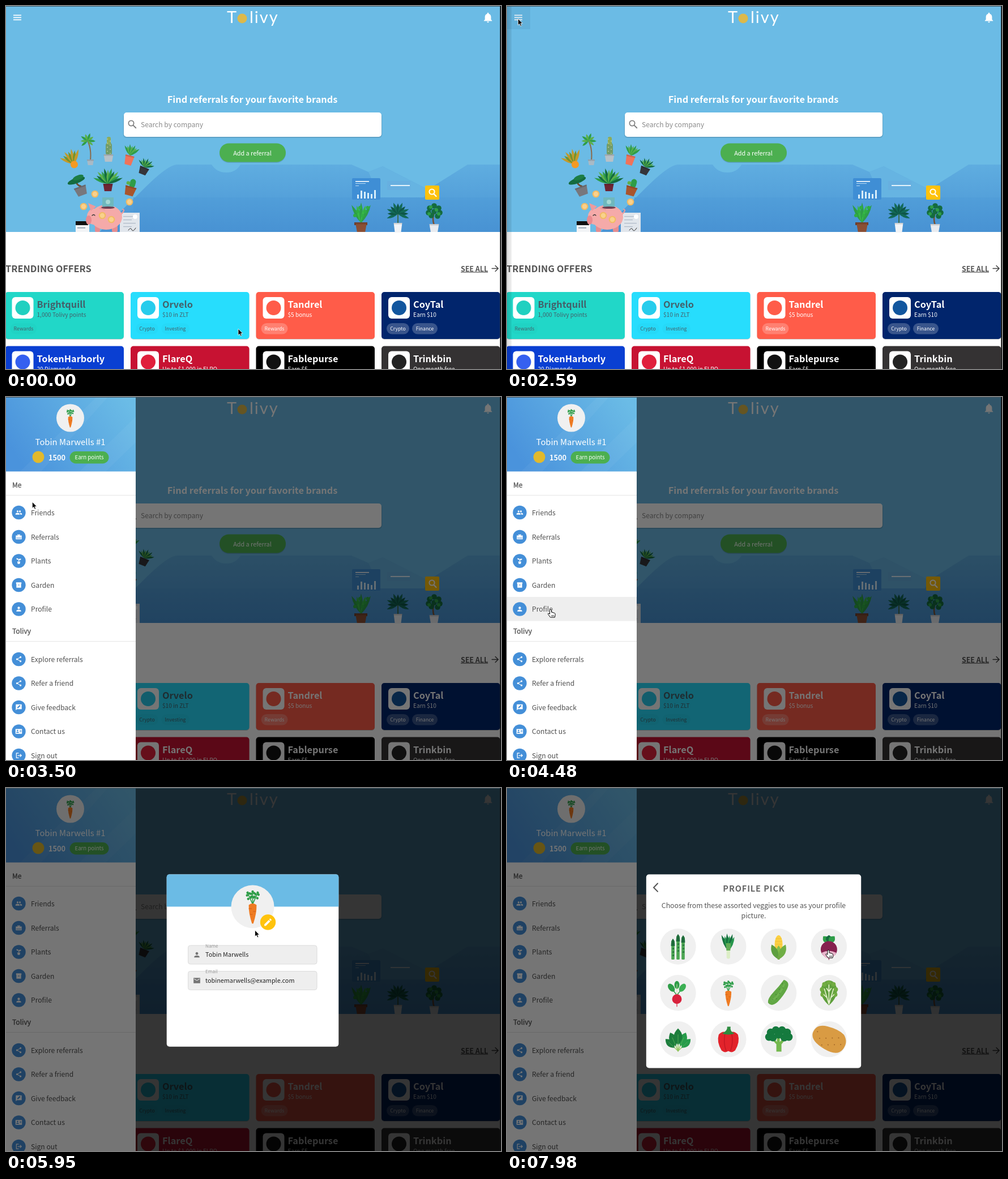
An HTML page for the animation above (8 s loop, 874 by 641 pixels).

```html
<!DOCTYPE html>
<html lang="en">
<head>
<meta charset="utf-8">
<title>Referral menu</title>
<style>
html, body { margin: 0; width: 100%; height: 100%; overflow: hidden; background: #fff; }
svg { display: block; width: 100vw; height: 100vh; }
text { font-family: "Noto Sans CJK JP", "Noto Sans CJK SC", "Open Sans", sans-serif; white-space: pre; }
.b { font-weight: 700; }
.m { text-anchor: middle; }
.logo { font-family: Lato, sans-serif; letter-spacing: 2px; }
</style>
</head>
<body>
<svg id="stage" viewBox="0 0 874 641" preserveAspectRatio="none"></svg>
<script>
const at = (x, y, c, rot = 0, s = 1) =>
  `<g transform="translate(${x} ${y}) rotate(${rot}) scale(${s})">${c}</g>`;
const rect = (x, y, w, h, fill, r = 0, more = '') =>
  `<rect x="${x}" y="${y}" width="${w}" height="${h}" rx="${r}" fill="${fill}" ${more}/>`;
const ell = (x, y, rx, ry, fill) => `<ellipse cx="${x}" cy="${y}" rx="${rx}" ry="${ry}" fill="${fill}"/>`;
const circ = (x, y, r, fill) => ell(x, y, r, r, fill);
const path = (d, fill) => `<path d="${d}" fill="${fill}" fill-rule="evenodd"/>`;
const line = (d, color, w = 1) =>
  `<path d="${d}" fill="none" stroke="${color}" stroke-width="${w}" stroke-linecap="round"/>`;
const text = (x, y, size, fill, s, cls = '') =>
  `<text x="${x}" y="${y}" font-size="${size}" fill="${fill}" class="${cls}">${s}</text>`;
const group = (id, c) => `<g id="${id}">${c}</g>`;
const range = (n, f) => Array.from({ length: n }, (_, i) => f(i)).join('');
const icon = (x, y, size, c) => at(x - size / 2, y - size / 2, c, 0, size / 24);

// Plants
const leaf = (len, w, fill) => path(`M0 0Q${w} ${-len / 2} 0 ${-len}Q${-w} ${-len / 2} 0 0`, fill);
const fan = (n, spread, len, w, fills) =>
  range(n, i => {
    const a = n > 1 ? -spread + 2 * spread * i / (n - 1) : 0;
    return at(0, 0, leaf(len * (1 - .12 * (i % 2)), w, fills[i % fills.length]), a);
  });
const pot = (w, h, fill) =>
  path(`M${-w / 2} 0h${w}l${-w * .14} ${h}h${-w * .72}z`, fill) + rect(-w / 2, 0, w, 2.5, '#0002');
const G1 = '#2e9d48', G2 = '#146b3f', G3 = '#5cb04a';
const blobs = (pts, r, fill) => pts.map(([x, y]) => circ(x, y, r, fill)).join('');

const leftPlants =
  at(120, 279, fan(7, 42, 27, 5, ['#c39a2c', '#6f942f']) + circ(0, 1, 6.5, '#f59a23'), -25) +
  line('M149 272Q151 252 144 238', '#8a6a4a', 2) + at(144, 238, fan(8, 130, 14, 4, [G1, G3])) + at(149, 271, pot(12, 10, '#a9bac6')) +
  rect(176, 241, 11, 23, '#719c6a', 5) + rect(178, 231, 7, 14, '#8cab5b', 3) +
  range(8, i => circ(179 + i % 2 * 5, 235 + i * 3.6, .8, '#e3dfae')) + at(181, 262, pot(17, 13, '#b7c1c8')) +
  at(219, 264, fan(7, 42, 20, 4, [G1, G3]) + pot(16, 17, '#f0735a'), 14) +
  at(245, 285, fan(9, 60, 17, 3, [G2, G3]) + pot(17, 13, '#35353a'), 22) +
  at(130, 319, line('M2 0Q-5-5-2-13', '#6f4c35', 3) + ell(-2, -12, 16, 5, G2) + ell(3, -16, 10, 4, '#1d7d45') + pot(22, 16, '#77777d'), -20) +
  at(180, 314, fan(11, 68, 28, 5, [G1, G2, G3]) + pot(17, 13, '#6d2433')) +
  at(221, 319, rect(-4, -14, 10, 16, G1, 5) + rect(-10, -8, 7, 6, G3, 3) + pot(20, 16, '#a9552c'), 16);

const pig =
  rect(201, 365, 35, 34, '#e1e6ec') + range(4, i => rect(207, 371 + i * 6, 22 - i % 2 * 7, 1.2, '#aeb9c6')) +
  circ(228, 372, 4, '#fff') + line('M216 396q4-6 6-1t7-3', '#333', 1) +
  rect(123, 380, 24, 19, '#f2f4f6') + rect(123, 380, 22, 7, '#111') + rect(126, 391, 14, 1.5, '#8796a6') +
  rect(157, 384, 9, 15, '#e58d91', 2) + rect(187, 384, 10, 15, '#e58d91', 2) +
  ell(177, 373, 28, 22, '#f5aaa9') + ell(155, 372, 12, 14, '#f5aaa9') + ell(146, 378, 5, 8, '#e98b90') +
  path('M150 362l-5-14 14 6zM164 358l7-8 4 11z', '#ee9a9c') + line('M152 370q3-3 5 0', '#333', 1.3) +
  line('M204 367q7-7 2-8', '#ee9a9c', 2) +
  rect(170, 338, 20, 18, '#6fb8bd') + circ(180, 346, 4, '#a5d8d4') + ell(180, 356, 12, 2, '#703f52');
const coin = (x, y) => circ(x, y, 6.3, '#f2bb63') + circ(x, y, 4.2, '#f9d18c');

const rightScene =
  rect(611, 304, 50, 38, '#3f8ed5', 2) +
  rect(617, 309, 24, 1.6, '#fff') + rect(617, 313, 18, 1, '#b8dcf5') + rect(617, 317, 6, 1, '#b8dcf5') +
  range(6, i => { const h = 7 + i * 7 % 9; return rect(620 + i * 6, 340 - h, 3, h, '#d8eefb'); }) +
  rect(673, 309, 41, 16, '#67afe0') + rect(679, 316, 34, 2, '#e3f2fb') +
  rect(740, 317, 25, 25, '#ffc20d', 2) + `<circle cx="752" cy="328" r="4.6" fill="none" stroke="#fff" stroke-width="2"/>` + line('M755.5 332l4 4', '#fff', 2.2) +
  at(627, 383, fan(5, 28, 36, 6, [G1, '#38b848']) + range(6, i => circ(-11 + i * 4.5, -13 - i % 3 * 7, 3, '#2fae43')) + rect(-12, -1, 23, 5, '#6d3f2e') + pot(20, 16, '#8a4f35')) +
  at(692, 383, line('M0 0V-20', '#3d6c4b', 2) + at(0, -16, fan(11, 112, 21, 5, ['#136a57', '#0e5648'])) + pot(15, 17, '#f1f3f6')) +
  at(756, 385, line('M0 2Q-4-9 0-20', '#7a5032', 2.5) +
    blobs([[-8, -28], [0, -32], [8, -28], [-10, -20], [10, -20], [0, -22], [-5, -15], [6, -14]], 4.8, G2) +
    blobs([[-6, -30], [4, -25], [8, -18], [-9, -18]], 3, G1) + pot(17, 14, '#e9ebef'));

const bell = path('M12 22c1.1 0 2-.9 2-2h-4c0 1.1.9 2 2 2zm6-6v-5c0-3.07-1.63-5.64-4.5-6.32V4c0-.83-.67-1.5-1.5-1.5s-1.5.67-1.5 1.5v.68C7.64 5.36 6 7.92 6 11v5l-2 2v1h16v-1l-2-2z', '#fff');

const hero =
  rect(0, 0, 874, 399, '#6bbbe5') +
  path('M165 399L236 330Q285 280 302 280H363Q372 294 389 294T414 280H610L640 293 665 283 745 324 815 280H874V399Z', 'url(#hill)') +
  path('M640 293L665 283 745 324 738 338H660Z', '#66b4e2') +
  rect(225, 338, 649, 61, 'url(#floor)') +
  leftPlants + pig + [[157, 332], [218, 346], [137, 354], [170, 370], [186, 377]].map(p => coin(...p)).join('') +
  rightScene +
  range(3, i => rect(13, 15.5 + i * 4, 14, 1.7, '#fff')) +
  text(390, 30, 29, '#fff', 'T', 'logo') + circ(417, 22, 8.5, '#dcb94b') + text(430, 30, 29, '#fff', 'livy', 'logo') +
  at(840.2, 9.5, bell, 0, .9) +
  text(435, 171, 16.3, '#fff', 'Find referrals for your favorite brands', 'b m') +
  rect(207, 189, 457, 44, '#0002', 6) + rect(208, 188, 455, 43, '#fff', 5) +
  `<circle cx="221" cy="207" r="4.6" fill="none" stroke="#808080" stroke-width="1.8"/>` + line('M224.6 210.6l4.6 4.6', '#808080', 2) +
  text(238, 214, 12.1, '#8b8b8b', 'Search by company') +
  rect(377, 244, 117, 33, '#0002', 16.5) + rect(377, 242.5, 117, 33, '#4caf50', 16.5) +
  text(435, 263.5, 10.8, '#fff', 'Add a referral', 'm');

// Offer cards: fill, mark colour, name, note, chips as [x, width, label]
const cards = [
  ['#21d7c8', '#21d0c0', 'Brightquill', '1,000 Tolivy points', [[7, 47, 'Rewards']]],
  ['#27ddfd', '#27ccec', 'Orvelo', '$10 in ZLT', [[7, 40, 'Crypto'], [52, 50, 'Investing']]],
  ['#ff5c49', '#ff5c49', 'Tandrel', '$5 bonus', [[7, 47, 'Rewards']]],
  ['#01256c', '#12569e', 'CoyTal', 'Earn $10', [[7, 40, 'Crypto'], [52, 45, 'Finance']]],
  ['#0a3fd2', '#3560f0', 'TokenHarborly', '20 Diamonds', []],
  ['#c71232', '#e0203c', 'FlareQ', 'Up to $1,000 in FLRQ', []],
  ['#000', '#111', 'Fablepurse', 'Earn $5', []],
  ['#343233', '#222', 'Trinkbin', 'One month free', []]
];
const card = ([fill, mark, name, note, chips], i) => {
  const ink = i < 2 ? '#44606a' : '#fff';
  return at(-1.5 + i % 4 * 221.5, i < 4 ? 505 : 600.5,
    rect(0, 1, 209.5, 83, '#0003', 5) + rect(0, 0, 209.5, 83, fill, 5) +
    rect(12, 9, 38, 38, '#fff', 6) + circ(31, 28, 13, mark) +
    text(56, 28, 16.3, ink, name, 'b') + text(56, 44, 10.1, ink, note) +
    chips.map(([x, w, s]) => rect(x + 2, 55, w, 19.5, i < 2 ? '#00000005' : '#ffffff38', 10) +
      text(x + 2 + w / 2, 68, 8.7, ink, s, 'm')).join(''));
};
const page =
  rect(0, 0, 874, 641, '#fff') + hero +
  text(-1, 470, 16.4, '#555', 'TRENDING OFFERS', 'b') +
  text(803, 468.5, 12.4, '#555', 'SEE ALL', 'b') + rect(803, 469.5, 48, 1.2, '#555') +
  line('M858 463.5H869M864 458.5l5 5-5 5', '#444', 1.5) +
  cards.map(card).join('');

// Vegetables, each centred on 0,0
const veg = {
  asparagus: [[-9, -11], [0, -19], [9, -17]].map(([x, y]) =>
    rect(x - 2.8, y, 5.6, 23 - y, '#4da653', 1.5) + path(`M${x - 3.4} ${y + 10}Q${x - 3.4} ${y} ${x} ${y - 3}Q${x + 3.4} ${y} ${x + 3.4} ${y + 10}Z`, '#1f6b3b') +
    range(3, i => path(`M${x - 2} ${y + 15 + i * 6}l4-2v3z`, '#1f6b3b'))).join(''),
  leek: at(0, 8, fan(6, 23, 31, 5.5, ['#16713f', '#27964d'])) +
    path('M-3.5-4H3.5L3 20Q0 23-3 20Z', '#dcedc6') + path('M-4-6H4L3.5 7H-3.5Z', '#62ab55'),
  corn: ell(0, -4, 7, 16, '#fbd043') + range(5, i => line(`M-5 ${-14 + i * 5}H5`, '#e9b52e', .7)) +
    at(0, 22, leaf(24, 9, '#83bd4b')) + at(-1, 22, leaf(28, 11, '#5e9f3f'), -24) + at(1, 22, leaf(28, 11, '#6fae45'), 24) +
    rect(-2, 17, 4, 6, '#71a544', 1),
  beet: at(0, -7, fan(3, 42, 15, 11, [G1, G2])) + circ(0, 5, 14.5, '#86204f') + path('M-13 11Q0 4 13 11 8 21 0 21T-13 11Z', '#e8b6cc') + line('M0 19V23', '#a8466f', 1.5),
  radish: at(-2, 3, at(-1, 0, line('M0 0V-12', G1, 1.5) + ell(0, -15, 5, 8, G1), -36) + at(1, 0, line('M0 0V-12', G1, 1.5) + ell(0, -15, 5, 8, '#3cb054'), 36) + ell(0, -17, 4.5, 7, G1)) +
    line('M-2 3V-15', '#c8e3a3', 1) + circ(-2, 11, 8.5, '#d9213c') + line('M-2 18V24', '#d9213c', 1.2),
  carrot: range(3, i => at(0, -3, line('M0 0V-16', G1, 1.2) + blobs([[-2.5, -9], [2.5, -10], [-2, -14], [2, -15], [0, -17]], 1.7, G1), -24 + i * 24)) +
    path('M-5.3-2Q0-6 5.3-2 5.6 9 1 23 0 24-1 23-5.6 9-5.3-2Z', '#ef7b22') + line('M-5 3h3.5M1 7h3M-3 11h2.5', '#cf5f16', .8),
  cucumber: at(0, 0, path('M-6-24Q6-28 8-14 10-2 8 14 5 28-5 25-10 20-8 4-6-10-6-24Z', '#61a744') +
    line('M-1-18Q4-2-1 17', '#6fb350', 3) + range(7, i => circ(-4 + i * 5 % 9, -17 + i * 5.5, .8, '#3e7e31')), 36),
  lettuce: path('M0 22Q-16 8-14-8-10-22 0-22 10-22 14-8 16 8 0 22Z', '#5f9f3d') +
    blobs([[-8, -15], [0, -18], [8, -15], [-12, -6], [12, -6], [-11, 3], [11, 3]], 4, '#71ac41') +
    line('M0 20V-14M0 20L-8-7M0 20L8-7M-4 8L-9 3M4 8L9 3M0-2L-4-8M0-2L4-8', '#e7f1ce', 1.6),
  spinach: range(5, i => {
    const turn = [-46, 46, -23, 23, 0][i];
    return at(0, 21, line('M0 0V-20', '#8fc45a', 1.6) + at(0, -11, leaf(29, 15, ['#1d7d3c', '#279c4b'][i % 2]) + line('M0 0V-18', '#5fb45b', .8)), turn, 1 - Math.abs(turn) / 200);
  }),
  pepper: path('M0-10Q9-17 17-8 21 5 12 20 6 25 0 21-6 25-12 20-21 5-17-8-9-17 0-10Z', '#e2232b') + line('M-6-10Q-9 7-4 20M6-10Q9 7 4 20', '#bd1522', 1.2) + path('M-11-10Q-1-15-2-22L4-22Q2-14 11-10Q0-6-11-10Z', '#2d8c3f'),
  broccoli: path('M-14-2L-4 9V22H5V9L14-2 10-4 2 5V-5H-3V5L-10-4Z', '#73b84d') + blobs([[-17, -4], [-14, -12], [-5, -16], [6, -16], [15, -12], [18, -4], [0, -8], [-10, -3], [10, -3]], 6.8, '#157a3e'),
  potato: at(0, 0, path('M-30-6Q-27-24-6-22T25-12Q35 0 27 14T-6 18-30-6Z', '#d99b43') + range(9, i => circ(-22 + i * 5.5, -10 + i * 11 % 24, 1, '#a4692a')), 9)
};
veg.spinach = [].concat(veg.spinach).join('');

// Drawer
const W = '#fff';
const person = c => path('M12 12c2.2 0 4-1.8 4-4s-1.8-4-4-4-4 1.8-4 4 1.8 4 4 4zm0 2c-2.7 0-8 1.3-8 4v2h16v-2c0-2.7-5.3-4-8-4z', c);
const share = line('M18 5 6 12l12 7', W, 2) + line('M18 5h.01M6 12h.01M18 19h.01', W, 6);
const items = [
  [204, 'Friends', circ(8, 8, 3, W) + circ(16, 8, 3, W) + path('M1 19v-2.5Q2 13 8 13t7 3.5V19zM17 19v-3l-2-3q7 0 8 3.5V19z', W)],
  [247, 'Referrals', path('M2 7H22V20H2ZM4 15V17H20V15Z', W) + line('M7 11l5-5 5 5M8 5h3M13 5h3', W, 2)],
  [289.5, 'Plants', group('sprout', path('M7 14h10l-1.5 8h-7zM11 13V8Q4 9 4 3q7-1 8 4 2-4 8-2 0 5-7 5v3z', W))],
  [332, 'Garden', path('M3 3H21V8H20V21H4V8H3ZM9 11V13H15V11Z', W)],
  [374.5, 'Profile', person(W)],
  [463, 'Explore referrals', share],
  [505.5, 'Refer a friend', share],
  [548, 'Give feedback', path('M2 2H22V18H6L2 22ZM7 15H10L18 7 15 4 7 12Z', W)],
  [590.5, 'Contact us', path('M1 4H23V20H1ZM3 17H13Q12 13 8 13T3 17ZM5.5 9a2.5 2.5 0 0 0 5 0 2.5 2.5 0 0 0-5 0ZM15 8V10H21V8ZM15 12V14H21V12Z', W)],
  [633, 'Sign out', line('M11 4H4V20H11M9 12H21M17 8l4 4-4 4', W, 2.4)]
];
const heading = (y, s) =>
  `<g stroke="#555" stroke-width=".3">${text(11, y, 12.1, '#555', s)}</g>` + rect(0, y + 13, 229, 1, '#e6e6e6');
const drawer =
  rect(0, 0, 229, 641, '#fff') + rect(0, 0, 229, 131.5, 'url(#head)') +
  path('M25 131.5L160 0H180L62 131.5ZM130 131.5L229 35V80L176 131.5Z', '#ffffff0a') +
  circ(113.5, 37, 24.5, '#f0f0f0') +
  text(113.5, 84.5, 14.8, '#fff', 'Tobin Marwells #1', 'm') +
  text(75, 112, 12.7, '#fff', '1500', 'b') +
  rect(112.5, 96, 69, 21.5, '#4caf50', 10.7) + text(147, 110.2, 9.6, '#fff', 'Earn points', 'm') +
  group('late', at(113.5, 37, veg.carrot, 0, .72) + circ(57, 106, 10.5, '#e2b92c')) +
  group('hover', rect(0, 353, 229, 42.5, '#eee')) +
  heading(160, 'Me') + heading(418, 'Tolivy') +
  items.map(([y, s, c]) => circ(22.5, y, 12.2, '#448fd8') + icon(22.5, y, 12.5, c) + text(44, y + 4.8, 12.1, '#505050', s)).join('');

// Dialogs
const field = (y, label, value, mark) =>
  rect(321.5, y, 227.5, 33, '#eee', 4, 'stroke="#dcdcdc"') + icon(337, y + 16.5, 14, mark) +
  text(352, y + 3.5, 8.2, '#9a9a9a', label) + text(352, y + 20.3, 10.85, '#222', value);
const mail = path('M2 4H22V20H2ZM20 8V6L12 11 4 6V8L12 13Z', '#757575');
const profile =
  rect(283.7, 152.6, 303.6, 304.2, '#fff', 5) +
  group('details',
    path('M283.7 209.5V157.6q0-5 5-5H582.3q5 0 5 5V209.5Z', '#6bbbe5') +
    circ(435.5, 209.5, 38, '#f0f0f0') + group('face', at(435.5, 209, veg.carrot, 0, 1.3)) +
    circ(462.5, 237, 13.7, '#ffc30c') +
    icon(462.5, 237, 17, path('M3 17.2V21h3.8L17.8 9.9l-3.7-3.7zM20.7 7q.8-.7 0-1.4l-2.3-2.3q-.7-.8-1.4 0l-1.9 1.8 3.8 3.8z', W)) +
    field(278, 'Name', 'Tobin Marwells', person('#757575')) +
    field(323.5, 'Email', 'tobinemarwells@example.com', mail));
const picker =
  rect(245.8, 152.6, 379.4, 341.8, '#fff', 5) +
  line('M266 168.5l-7 7.2 7 7.2', '#555', 2) +
  `<g letter-spacing=".9">${text(436, 183, 14.5, '#666', 'PROFILE PICK', 'b m')}</g>` +
  text(435.5, 212, 12.24, '#555', 'Choose from these assorted veggies to use as your profile', 'm') +
  text(435.5, 229.5, 12.24, '#555', 'picture.', 'm') +
  range(12, i => circ(302 + i % 4 * 88.8, 280 + (i >> 2) * 81.8, 31.7, '#f0f0f0')) +
  group('veggies', Object.values(veg).map((v, i) => at(302 + i % 4 * 88.8, 280 + (i >> 2) * 81.8, v)).join(''));

const grad = (id, dir, a, b) =>
  `<linearGradient id="${id}" ${dir}><stop stop-color="${a}"/><stop offset="1" stop-color="${b}"/></linearGradient>`;
const arrow = `<path d="M0 0V11.3L2.6 9 4.4 13 6.3 12.2 4.6 8.3H8Z" fill="#000" stroke="#fff" stroke-width=".8"/>`;
const hand = `<path d="M-2 1q1.5-2 3 0v4l5 1.3q2 .7 1.7 3l-.8 4.7H-1l-4-5.4q-.4-2 1.5-1.5L-2 8.3ZM2 10v2.5M4.5 10v2.5" fill="#fff" stroke="#000" stroke-width="1"/>`;
const scrim = id => group(id, rect(0, 0, 874, 641, '#000', 0, 'opacity=".54"'));

document.getElementById('stage').innerHTML =
  '<defs>' + grad('hill', 'x2="0" y2="1"', '#5fade0', '#4a94d4') + grad('floor', 'x2="0" y2="1"', '#519ed9', '#4892d3') +
  grad('head', 'y1=".6" y2=".2"', '#4a93dc', '#6bbce6') + grad('edge', '', '#0002', '#0001') + '</defs>' +
  page +
  group('press', rect(0, 0, 41, 41, '#1b5f8c1c')) + group('shade', rect(0, 0, 8, 641, 'url(#edge)')) +
  scrim('dim1') + group('drawer', drawer) + scrim('dim2') +
  group('profile', profile) + group('picker', picker) +
  rect(0, 0, 874, 1, '#3f5560') + rect(872.3, 0, 1.7, 641, '#0b0b0b') +
  group('cursor', group('arrow', arrow) + group('hand', hand));

const $ = id => document.getElementById(id);
const LOOP = 8000, STEP = 70;
// Visible spans in ms
const spans = {
  press: [[2520, 2800]], shade: [[2590, 2800]],
  dim1: [[2800, LOOP]], drawer: [[2800, LOOP]], late: [[2940, LOOP]], sprout: [[2940, LOOP]],
  hover: [[4480, 4900]], dim2: [[4550, LOOP]],
  profile: [[4550, 6930]], details: [[4690, LOOP]], face: [[4830, LOOP]],
  picker: [[6930, LOOP]], veggies: [[7070, LOOP]],
  hand: [[840, 1820], [4060, 4550], [6230, 6930], [7980, LOOP]]
};
// Pointer keys: time, x, y
const keys = [
  [0, 410, 570], [420, 26, 34], [840, 26, 34], [1260, 19.5, 22.5], [2800, 19.5, 22.5],
  [3150, 28, 78], [3220, 28, 78], [3850, 72, 335], [3990, 72, 335], [4060, 77.5, 375],
  [4760, 77.5, 375], [5250, 350, 310], [5460, 350, 310], [5950, 439.5, 251],
  [6230, 461, 237], [7280, 461, 237], [7910, 568, 286], [LOOP, 568, 286]
];
function pointer(t) {
  const i = Math.max(1, keys.findIndex(k => k[0] >= t));
  const [t0, x0, y0] = keys[i - 1], [t1, x1, y1] = keys[i];
  const p = (t - t0) / (t1 - t0), e = p * p * (3 - 2 * p);
  return [x0 + (x1 - x0) * e, y0 + (y1 - y0) * e];
}
function draw(now) {
  const t = Math.floor((now % LOOP + .5) / STEP) * STEP;
  const shown = id => spans[id].some(([a, b]) => t >= a && t < b);
  for (const id in spans) $(id).style.display = shown(id) ? '' : 'none';
  $('arrow').style.display = shown('hand') ? 'none' : '';
  $('drawer').setAttribute('transform', `translate(${t < 2870 ? -1 : 0} 0)`);
  $('cursor').setAttribute('transform', `translate(${pointer(t)})`);
}
const start = performance.now();
function frame() {
  draw(performance.now() - start);
  requestAnimationFrame(frame);
}
frame();
</script>
</body>
</html>
```
